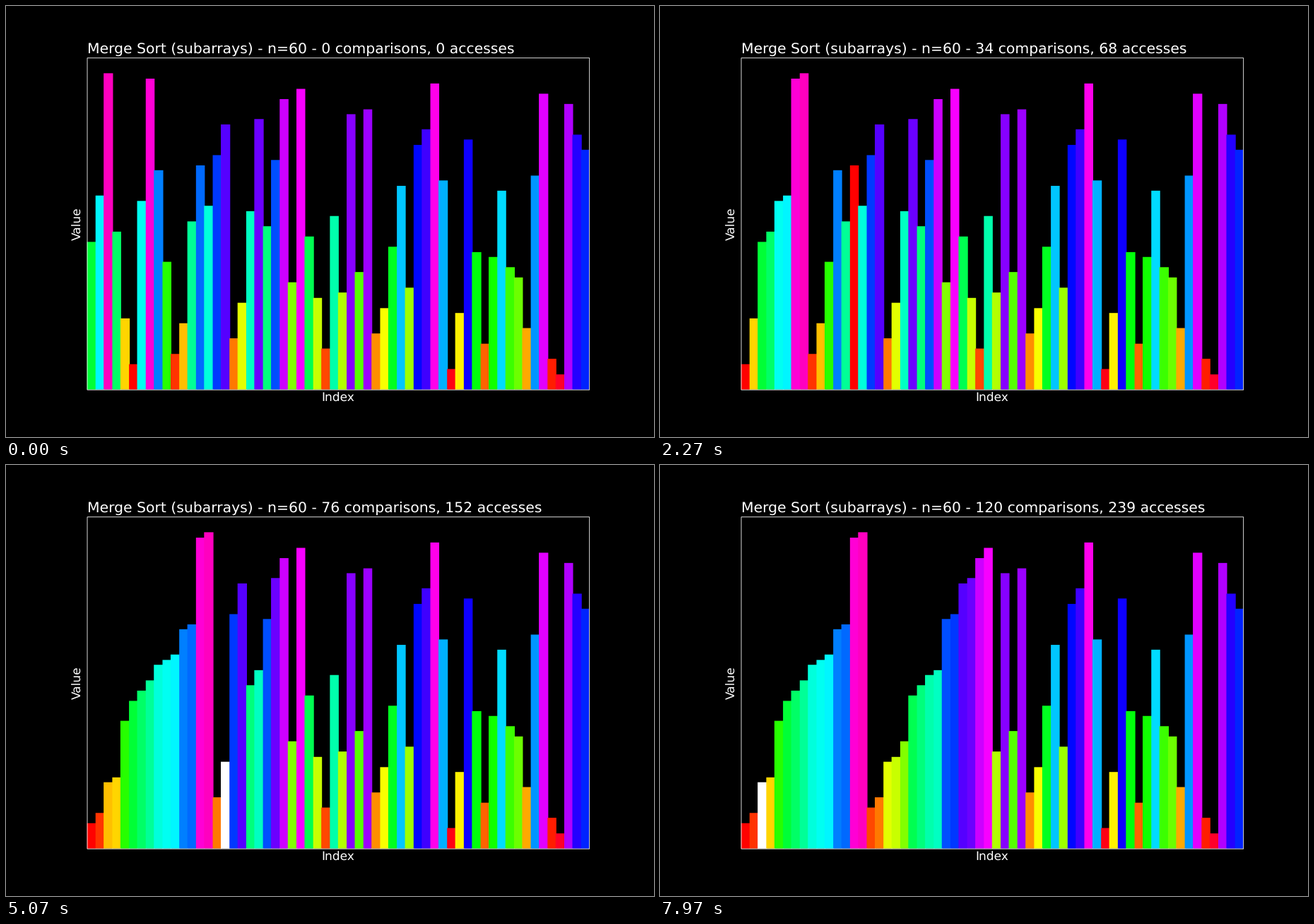
A matplotlib script that plays this animation: 917x611 px, repeating every 8 s.

```python
import numpy as np
import matplotlib as mpl
import matplotlib.pyplot as plt
from matplotlib.animation import FuncAnimation
from matplotlib.patches import Rectangle

mpl.rcParams["font.family"] = "DejaVu Sans"
mpl.rcParams["text.hinting"] = "none"

STAGE_W, STAGE_H, DPI = 917, 611, 64
FRAMES, LOOP_MS = 240, 8000

# Layout is done on a 1200 x 800 canvas scaled down to the stage.
W, H = 1200, 800
LEFT, RIGHT, TOP, BOTTOM = 150, 1080, 96, 712
EDGE = 100 / 72 / 2  # half the bar outline

VALUES = [
    29, 38, 62, 31, 14, 5, 37, 61, 43, 25, 7, 13, 33, 44, 36,
    46, 52, 10, 17, 35, 53, 32, 45, 57, 21, 59, 30, 18, 8, 34,
    19, 54, 23, 55, 11, 16, 28, 40, 20, 48, 51, 60, 41, 4, 15,
    49, 27, 9, 26, 39, 24, 22, 12, 42, 58, 6, 3, 56, 50, 47,
]
N = len(VALUES)
LOW, HIGH = min(VALUES), max(VALUES)
CMAP = mpl.colormaps["gist_rainbow"]


def points(px):
    """Canvas pixels to points on the stage."""
    return px * STAGE_W / W * 72 / DPI


def snap(x):
    return np.floor(x + 0.5) + 0.5


def bar_top(value):
    return snap(BOTTOM - (BOTTOM - TOP) * value / (HIGH * 1.05)) - EDGE


def bar_color(value):
    return CMAP((value - LOW) / (HIGH - LOW))


def trace_sort(values):
    """Return one (array, index, colour, comparisons) entry per access."""
    arr = list(values)
    steps = [(arr[:], None, None, 0)]
    comparisons = 0

    def sort(lo, hi):
        nonlocal comparisons
        if lo >= hi:
            return
        mid = (lo + hi) // 2
        sort(lo, mid)
        sort(mid + 1, hi)
        merged = sorted(arr[lo:hi + 1])
        for i in range(lo, hi + 1):
            steps.append((arr[:], i, "white", comparisons))
            comparisons += 1
        for i, value in enumerate(merged, lo):
            arr[i] = value
            steps.append((arr[:], i, "red", comparisons))

    sort(0, len(arr) - 1)
    return steps


steps = trace_sort(VALUES)

fig = plt.figure(figsize=(STAGE_W / DPI, STAGE_H / DPI), dpi=DPI,
                 facecolor="black")
ax = fig.add_axes([0, 0, 1, 1])
ax.axis("off")

edges = snap(LEFT + (RIGHT - LEFT) / N * np.arange(N + 1))
starts = np.maximum(edges[:-1] - EDGE, LEFT)
ends = np.minimum(edges[1:] + EDGE, RIGHT)
bars = ax.bar(starts, [-1] * N, ends - starts, bottom=BOTTOM, align="edge",
              linewidth=0, snap=False)
ax.set_xlim(0, W)
ax.set_ylim(H, 0)

ax.add_patch(Rectangle((LEFT + 0.5, TOP + 0.5), RIGHT - LEFT, BOTTOM - TOP,
                       fill=False, edgecolor="white", snap=False,
                       linewidth=points(0.8 * 100 / 72), zorder=3))

PAD = 4 * 100 / 72
label = dict(color="white", fontsize=points(16 * 100 / 72), ha="center")
ax.text((LEFT + RIGHT) / 2, BOTTOM + PAD, "Index", va="top", **label)
ax.text(LEFT - PAD, (TOP + BOTTOM) / 2, "Value", va="bottom", rotation=90,
        rotation_mode="anchor", **label)
title = ax.text(LEFT, TOP - 1.5 * PAD, "", color="white", va="baseline",
                fontsize=points(19.2 * 100 / 72))


def update(frame):
    arr, active, color, comparisons = steps[frame]
    for i, (bar, value) in enumerate(zip(bars, arr)):
        bar.set_height(bar_top(value) - BOTTOM)
        bar.set_facecolor(color if i == active else bar_color(value))
    title.set_text(f"Merge Sort (subarrays) - n={N} - "
                   f"{comparisons} comparisons, {frame} accesses")
    return [*bars, title]


anim = FuncAnimation(fig, update, frames=FRAMES, interval=LOOP_MS / FRAMES,
                     init_func=lambda: update(0), repeat=True, repeat_delay=0)
plt.show()
```
